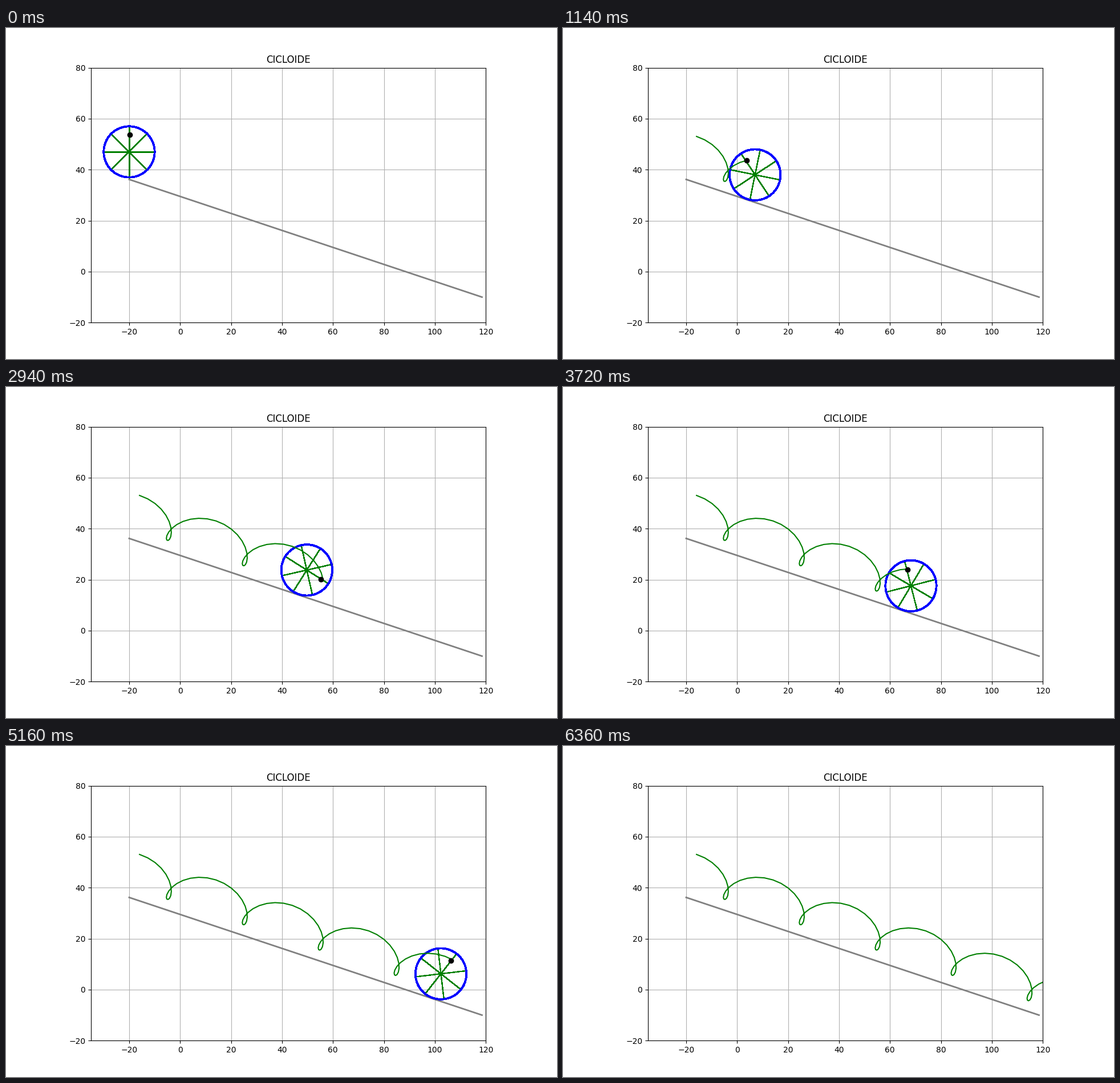
These frames come from a looping animation (966x580 px, 8000 ms). A matplotlib script:

```python
import numpy as np
import matplotlib.pyplot as plt
from matplotlib.animation import FuncAnimation

DPI = 100
INTERVAL = 20          # ms
FRAMES = 400
HOLD = 3               # ticks per step of the wheel
LAST = 106

RADIUS = 10
SPEED = 1.5            # distance along the slope per step
SPIN = 0.3             # radians per step
START = np.array([-20.0, 47.0])
SLOPE = np.arctan(1 / 3)
PEN_RADIUS = 6.65


def center(k):
    """Centre of the wheel after k steps."""
    s = SPEED * np.asarray(k, float)
    return START[0] + s * np.cos(SLOPE), START[1] - s * np.sin(SLOPE)


def trail_points(k):
    x, y = center(k)
    return (x + 0.67 + PEN_RADIUS * np.sin(SPIN * k),
            y + 0.165 + PEN_RADIUS * np.cos(SPIN * k))


def pen_point(k):
    x, y = center(k)
    return x + 0.13 + 6.3 * np.sin(SPIN * k), y + PEN_RADIUS * np.cos(SPIN * k)


plt.rcParams["font.family"] = "DejaVu Sans"
fig, ax = plt.subplots(figsize=(966 / DPI, 580 / DPI), dpi=DPI)
ax.set_aspect("equal")
ax.set_xlim(-35, 120)
ax.set_ylim(-20, 80)
ax.set_title("CICLOIDE")
ax.grid(True)

ramp_x = np.array([-20, 118.5])
ax.plot(ramp_x, 29.5 - ramp_x / 3, color="gray", lw=2)

spokes = [ax.plot([], [], color="green", lw=1, antialiased=False)[0]
          for _ in range(4)]
rim, = ax.plot([], [], color="blue", lw=2, antialiased=False)
trail, = ax.plot([], [], color="green", lw=1.5)
pen, = ax.plot([], [], "o", color="black", ms=6)

turn = np.linspace(0, 2 * np.pi, 181)
path_x, path_y = trail_points(np.arange(LAST + 1))


def update(i):
    k = min(i // HOLD, LAST)
    x, y = center(k)
    rim.set_data(x + RADIUS * np.cos(turn), y + RADIUS * np.sin(turn))
    for n, spoke in enumerate(spokes):
        a = SPIN * k + n * np.pi / 4
        dx, dy = RADIUS * np.sin(a), RADIUS * np.cos(a)
        spoke.set_data([x - dx, x + dx], [y - dy, y + dy])
    trail.set_data(path_x[1:k + 1], path_y[1:k + 1])
    px, py = pen_point(k)
    pen.set_data([px], [py])
    return [rim, trail, pen, *spokes]


anim = FuncAnimation(fig, update, frames=FRAMES, interval=INTERVAL,
                     repeat=True, repeat_delay=0)
plt.show()
```
